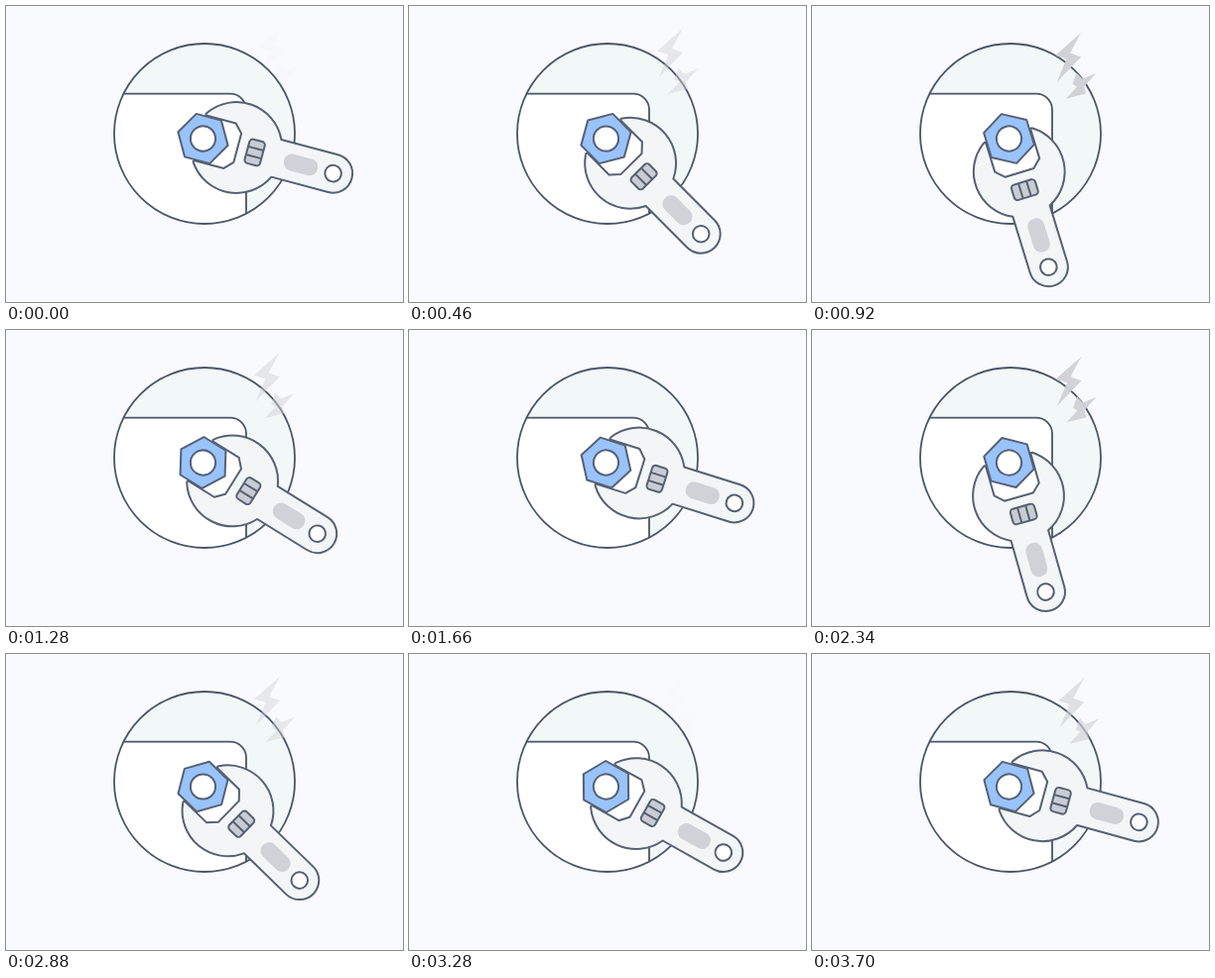
Recreate the animation shown at these times as an HTML page. Size 400 px wide and 299 px high, loop 3.72 s.

```html
<!DOCTYPE html>
<html lang="en">
<head>
<meta charset="utf-8">
<title>Wrench</title>
<style>
  html, body { margin: 0; width: 100%; height: 100%; overflow: hidden; background: #f8fafd; }
  svg { display: block; width: 100%; height: 100%; }
  .line { stroke: #4a5568; stroke-width: 1.8; }
  .tool { stroke: #566074; stroke-width: 2; stroke-linejoin: round; }
  .pale { fill: #f2f6f7; }
  .grey { fill: #cfd2d7; }
</style>
</head>
<body>
<svg viewBox="0 0 400 299">
  <defs>
    <clipPath id="lens"><circle cx="200" cy="129" r="91"/></clipPath>
  </defs>

  <circle cx="200" cy="129" r="91" fill="#f2f7f7"/>
  <path class="line" clip-path="url(#lens)" fill="#fff" d="M90 88.7H226a16 16 0 0 1 16 16V240H90Z"/>
  <circle class="line" cx="200" cy="129" r="91" fill="none"/>

  <g id="bolts" class="grey">
    <path d="M271 27 245 50 256.5 53.5 246.500 77 271 51.500 260 47.500Z"/>
    <path d="M286 68 272.500 73.500 266.500 67.500 262.500 79 267 81.500 256 93.500 276 88.500 274 81.500Z"/>
  </g>

  <g id="wrench" class="tool">
    <path class="pale" d="M-3-26A46 46 0 0 1 76.500-19.500H135.700a19.500 19.500 0 0 1 0 39H76.500A46 46 0 0 1-3 26Q-5 23.500-1 23.500H28L36 15V-15L28-23.500H-1Q-5-23.500-3-26Z"/>
    <rect class="grey" x="84.500" y="-8.500" width="35" height="17" rx="8" stroke="none"/>
    <circle cx="135.700" r="8.300" fill="#fff"/>
    <rect x="46" y="-12.500" width="16" height="25" rx="3.500" fill="#c9cdd3"/>
    <path d="M46-4.200H62M46 4.200H62"/>
    <path id="nut" fill="#99c3fb"/>
    <circle r="12.600" fill="#fff"/>
  </g>
</svg>

<script>
  const LOOP = 3720;
  const $ = id => document.getElementById(id);
  const wrench = $('wrench'), bolts = $('bolts');

  const corners = Array.from({ length: 6 }, (_, i) => {
    const a = i * Math.PI / 3;
    return [26 * Math.cos(a), 26 * Math.sin(a)].map(v => v.toFixed(2)).join(' ');
  });
  $('nut').setAttribute('d', `M${corners.join('L')}Z`);

  // [time, angle]
  const turns = [[95, 15], [825, 75], [1555, 15], [2285, 75], [2765, 45], [3775, 15]];
  const ease = x => x < .5 ? 2 * x * x : 1 - 2 * (1 - x) ** 2;

  function angleAt(t) {
    if (t <= turns[0][0]) return turns[0][1];
    const i = turns.findIndex(k => k[0] > t);
    const [t0, a0] = turns[i - 1], [t1, a1] = turns[i];
    return a0 + (a1 - a0) * ease((t - t0) / (t1 - t0));
  }

  const glowAt = t => (1 - Math.cos(2 * Math.PI * (t - 95) / 1570)) / 2;

  function draw(t) {
    const glow = glowAt(t), away = 1 - glow;
    wrench.setAttribute('transform', `translate(198.5 134) rotate(${angleAt(t)})`);
    bolts.setAttribute('transform', `translate(${9 * away} ${-8 * away})`);
    bolts.setAttribute('opacity', glow);
  }

  const start = performance.now();
  function tick() {
    draw((performance.now() - start) % LOOP);
    requestAnimationFrame(tick);
  }
  tick();
</script>
</body>
</html>
```
